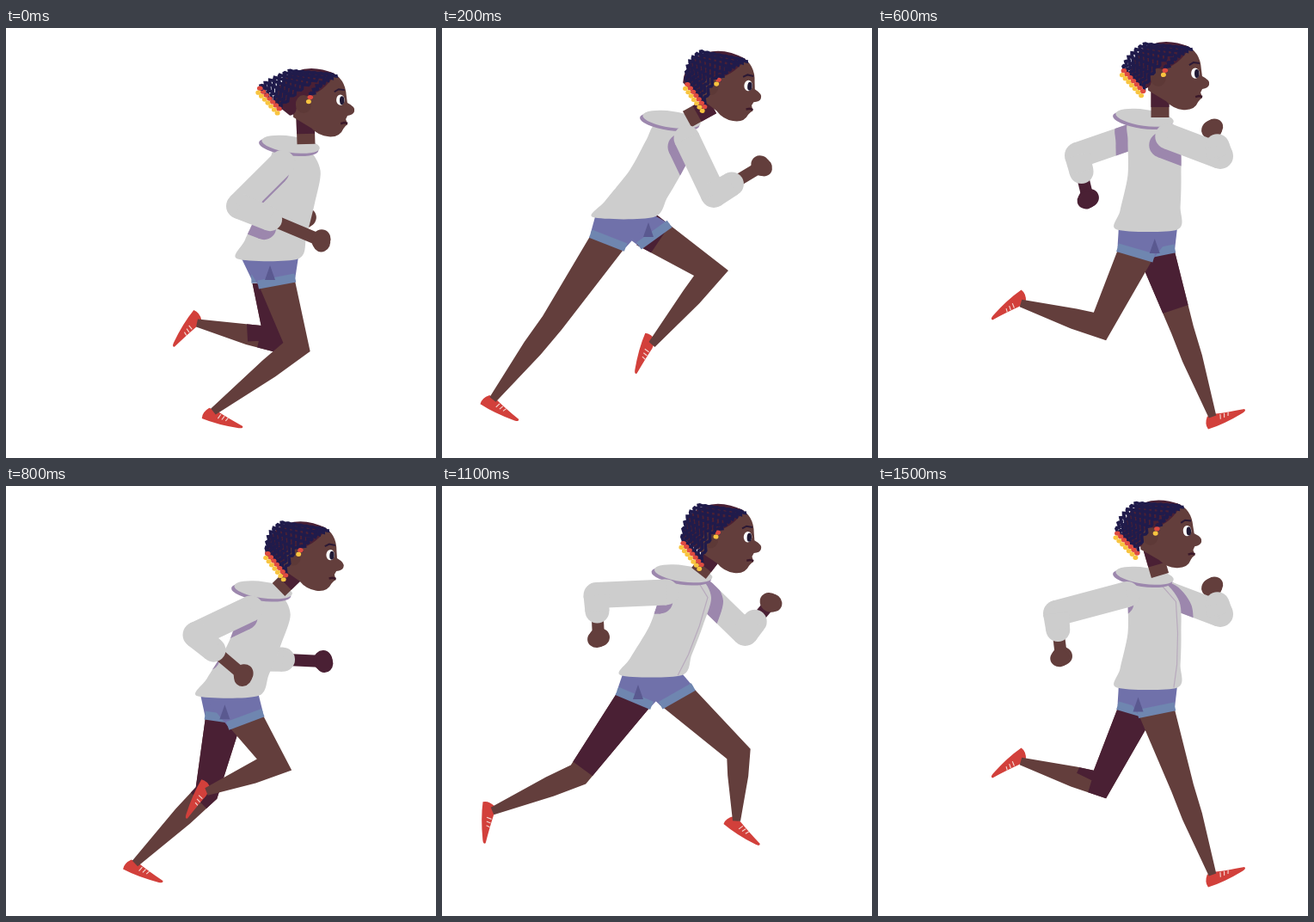
Animation, 500 px wide and 500 px high, one loop 1600 ms. Source, as an HTML page:

```html
<!DOCTYPE html>
<html lang="en">
<head>
<meta charset="utf-8">
<title>Runner</title>
<style>
html, body { margin: 0; height: 100%; overflow: hidden; background: #fff; }
svg { display: block; width: 100%; height: 100%; }
</style>
</head>
<body>
<svg id="stage" viewBox="0 0 500 500"></svg>
<script>
const SKIN = '#633e3c', DARK = '#4a2034', GREY = '#cdcdcd', PURPLE = '#9c87ad',
      DENIM = '#7071aa', CUFF = '#6f86b0', SHOE = '#d2403b', NAVY = '#201b4b';
const LOOP = 1600, STEP = 100;

// One stride. Legs: knee, ankle, foot angle. Arms: elbow and hand, relative to the collar.
// The nose has one place for each of the two strides in a loop.
const pass = {
  waist: [306, 266], collar: [338, 141], nose: [[405, 95], [405, 95]],
  trail: [338, 371, 241, 446, 17], lead: [311, 363, 222, 343, 124],
  front: [-67, 66, 28, 106], nearBack: [-67, 66, 28, 106], farBack: [0, 50, 10, 80]
};
const push = {
  waist: [213, 218], collar: [274, 112], nose: [[371, 80], [380, 90]],
  trail: [128, 343, 59, 432, 28], lead: [313, 285, 244, 368, 108],
  front: [42, 82, 97, 49], nearBack: [-104, 27, -89, 80], farBack: [-30, 50, -30, 80]
};
const flight = {
  waist: [277, 218], collar: [301, 103], nose: [[377, 54], [362, 53]],
  trail: [189, 328, 58, 324, 157], lead: [377, 338, 441, 411, -38],
  front: [88, 45, 92, 8], nearBack: [-112, 12, -122, 57], farBack: [-70, 40, -54, 86]
};
const land = {
  waist: [314, 232], collar: [317, 110], nose: [[385, 64], [376, 63]],
  trail: [258, 347, 166, 320, 140], lead: [354, 351, 389, 452, -23],
  front: [81, 39, 72, 8], nearBack: [-110, 38, -104, 88], farBack: [-85, 38, -73, 88]
};

// The near leg trails in the first stride and leads in the second.
function assign(stride, half) {
  const { waist, collar, nose, trail, lead, front, nearBack, farBack } = stride;
  return {
    waist, collar, nose: nose[half],
    nearLeg: half ? lead : trail, farLeg: half ? trail : lead,
    nearArm: half ? nearBack : front, farArm: half ? front : farBack
  };
}
const KEYS = [
  [0, pass, 0], [200, push, 0], [400, flight, 0], [500, flight, 0], [600, land, 0],
  [700, pass, 1], [900, push, 1], [1000, push, 1], [1200, flight, 1], [1500, land, 1],
  [LOOP, pass, 0]
].map(([time, stride, half]) => [time, assign(stride, half)]);

const mix = (a, b, u) => a.map((v, i) => v + (b[i] - v) * u);
const shift = ([x, y], dx, dy) => [x + dx, y + dy];

function poseAt(t) {
  const next = KEYS.findIndex(([time]) => time > t);
  const [t0, a] = KEYS[next - 1], [t1, b] = KEYS[next];
  const pose = {};
  for (const part in a) pose[part] = mix(a[part], b[part], (t - t0) / (t1 - t0));
  return pose;
}

const polygon = (points, fill) => `<polygon points="${points.join(' ')}" fill="${fill}"/>`;
const path = (d, fill) => `<path d="${d}" fill="${fill}"/>`;
const line = (points, color, width, extra = '') =>
  `<polyline points="${points.join(' ')}" fill="none" stroke="${color}" stroke-width="${width}" ${extra}/>`;
const ellipse = (x, y, rx, ry, fill) =>
  `<ellipse cx="${x}" cy="${y}" rx="${rx}" ry="${ry}" fill="${fill}"/>`;
const place = ([x, y], angle, body) =>
  `<g transform="translate(${x} ${y}) rotate(${angle})">${body}</g>`;
const clipped = (id, shape, body) =>
  `<clipPath id="${id}">${shape}</clipPath><g clip-path="url(#${id})">${body}</g>`;

// Closed Catmull-Rom curve.
function smooth(points) {
  const n = points.length, at = i => points[(i + n) % n];
  let d = 'M' + at(0);
  for (let i = 0; i < n; i++) {
    const [a, b, c, e] = [at(i - 1), at(i), at(i + 1), at(i + 2)];
    const c1 = b.map((v, k) => v + (c[k] - a[k]) / 7);
    const c2 = c.map((v, k) => v - (e[k] - b[k]) / 7);
    d += `C${c1} ${c2} ${c}`;
  }
  return d + 'Z';
}

function direction(a, b) {
  const length = Math.hypot(b[0] - a[0], b[1] - a[1]) || 1;
  return [(b[0] - a[0]) / length, (b[1] - a[1]) / length];
}

// Tapered outline with mitred joints; each joint is [x, y, radius].
function mitred(joints) {
  const last = joints.length - 1, left = [], right = [];
  joints.forEach(([x, y, r], i) => {
    const d0 = direction(joints[Math.max(i - 1, 0)], joints[Math.max(i, 1)]);
    const d1 = direction(joints[Math.min(i, last - 1)], joints[Math.min(i + 1, last)]);
    const k = r / Math.max(1 + d0[0] * d1[0] + d0[1] * d1[1], .5);
    const nx = -(d0[1] + d1[1]) * k, ny = (d0[0] + d1[0]) * k;
    left.push([x + nx, y + ny]);
    right.unshift([x - nx, y - ny]);
  });
  return [...left, ...right];
}

// Tapered outline with round joints.
const rounded = (joints, fill) => joints.map(([x, y, r], i) =>
  ellipse(x, y, r, r, fill) + (i ? polygon(mitred([joints[i - 1], [x, y, r]]), fill) : '')
).join('');

const shoe = '<g transform="scale(.94 .88)">' +
  path('M-6-3L5-2Q18 2 40 7Q42 10 36 11Q10 15-11 13Q-13 5-6-3Z', SHOE) +
  [10, 15, 20].map(x => line([x, x / 6 - 1, x - 2, 7], '#f3d9d4', 1.2)).join('') + '</g>';

// Thigh, cuff and outline all follow from the line between waist and knee.
function makeLeg(waist, [kx, ky, ax, ay, foot]) {
  const knee = [kx, ky], ankle = [ax, ay], d = direction(waist, knee);
  const hip = shift(waist, d[0] * 30, d[1] * 30);
  const drop = 24 + 20 * Math.abs(d[0]);
  const cuffMid = shift(waist, d[0] * drop, d[1] * drop);
  const across = direction([0, 0], [d[1] + .6, -d[0]]);
  const cuff = [-22, 22].map(w => shift(cuffMid, across[0] * w, across[1] * w));
  const outline = polygon(
    mitred([[...hip, 21], [...knee, 13.5], [...mix(knee, ankle, .33), 12], [...ankle, 4.5]]), SKIN);
  return {
    hip, knee, ankle, cuff, cuffMid, outline,
    body: place(ankle, foot, shoe) + outline,
    shorts: polygon([shift(waist, -34, -2), shift(waist, 34, 0), cuff[1], cuff[0]], DENIM) +
      line(cuff, CUFF, 10)
  };
}

// The near leg's shadow runs down the far leg, longest as the knees pass.
function legShadow(far, near) {
  const gap = near.knee[0] - far.knee[0];
  const reach = Math.max(0, 1.3 + Math.min(gap / 170, -gap / 500));
  const thigh = Math.hypot(far.knee[0] - far.hip[0], far.knee[1] - far.hip[1]);
  return clipped('farLeg', far.outline,
    line([far.hip, far.knee, far.ankle], DARK, 60, `stroke-dasharray="${reach * thigh} 999"`));
}

function makeArm(collar, [ex, ey, hx, hy], wristColor, fistColor) {
  const elbow = shift(collar, ex, ey), hand = shift(collar, hx, hy);
  const shoulder = shift(collar, ex / 4, 16), cuff = mix(elbow, hand, .38);
  const angle = Math.atan2(hy - ey, hx - ex) * 180 / Math.PI;
  const fist = ellipse(0, -1, 11, 12, fistColor) + ellipse(2, 2, 10, 11, fistColor);
  const sleeve = fill => rounded([[...shoulder, 15], [...elbow, 15], [...cuff, 14]], fill);
  return { sleeve, body: line([cuff, hand], wristColor, 14) + place(hand, angle, fist) + sleeve(GREY) };
}

// Points up the spine: fraction from waist to collar, then offset to the side.
const BACK = [[1, -25], [.83, -26], [.5, -25], [.16, -33], [-.02, -36]];
const FRONT = [[-.02, 34], [.2, 37], [.5, 37], [.8, 34], [1, 12]];
const alongSpine = (p, side) =>
  side.map(([up, out]) => shift(mix(p.waist, p.collar, up), out, 0));

const hood = ellipse(0, 2, 35, 10, PURPLE) + ellipse(2, -1, 34, 9.5, GREY);

function braid(start, bend, end) {
  const points = [];
  for (let i = 0; i <= 36; i++) {
    const u = i / 36, wave = 1.4 * Math.sin(i * 1.3);
    points.push(shift(mix(mix(start, bend, u), mix(bend, end, u), u), wave, wave));
  }
  return line(points, NAVY, 3.6) +
    ellipse(end[0] + 1, end[1], 3.3, 2.6, '#df4b40') +
    ellipse(end[0] - 1, end[1] + 5, 3, 2.6, '#f8c43f');
}

// Braids fan from the hairline to the nape; their ends trail behind by the lag.
function braids(lag) {
  let out = braid([356, 13], [338, 20], [325, 39]);
  for (let i = 0; i < 7; i++) {
    const u = i / 6;
    out += braid(mix([352, 11], [308, 7], u), mix([318, 20], [285, 16], u),
      shift(mix([303, 68], [281, 44], u), lag[0], lag[1]));
  }
  return out;
}

const face =
  path('M350 10Q367 17 368 38L369 46Q379 51 377 56Q376 60 369 61L367 65L369 71' +
       'Q366 73 364 76Q360 86 347 85Q335 84 327 75L306 62L305 25Z', SKIN) +
  path('M355 12Q320-3 296 17Q284 32 285 46L302 60Q312 58 309 46Q311 38 321 38Q342 34 355 12Z', DARK) +
  ellipse(318, 47, 9, 10.5, '#5d3937') +
  ellipse(361, 42.5, 4.8, 6.2, '#fff') + ellipse(362.8, 43, 2.7, 5, '#211a35') +
  line([354, 33, 359, 30, 366, 31], '#2b1935', 2) +
  line([361, 70, 365, 69, 369, 70], '#3a1829', 2.5);

function headAndNeck({ nose, collar }, lag) {
  const top = shift(nose, -57, 10), base = shift(collar, 11, -6);
  const tilt = (nose[0] - collar[0] - 70) / 5;
  return line([top, base], SKIN, 21) + line([top, mix(top, base, .6)], DARK, 21) +
    place(nose, tilt, `<g transform="translate(-377 -54)">${face}${braids(lag)}</g>`);
}

function figure(t) {
  const p = poseAt(t), before = poseAt((t + LOOP - STEP) % LOOP);
  const lag = p.nose.map((v, i) => (before.nose[i] - v) / 2);
  const nearLeg = makeLeg(p.waist, p.nearLeg), farLeg = makeLeg(p.waist, p.farLeg);
  const nearArm = makeArm(p.collar, p.nearArm, SKIN, SKIN);
  const farArm = makeArm(p.collar, p.farArm, DARK, p.farArm[0] < 0 ? DARK : SKIN);
  const front = alongSpine(p, FRONT);
  const torso = path(smooth([...alongSpine(p, BACK), ...front]), GREY);
  const torsoShade = torso.replace(GREY, PURPLE);
  const fold = mix(p.waist, farLeg.cuffMid, .8);
  const zip = p.nearArm[0] < -90 ? line(front.map(q => shift(q, -4, 0)), '#b8aabd', 1.2) : '';

  return farArm.body +
    clipped('farSleeve', farArm.sleeve(GREY),
      place([14 * Math.sign(p.farArm[0]), 4], 0, torsoShade)) +
    farLeg.body + legShadow(farLeg, nearLeg) + farLeg.shorts +
    nearLeg.body + nearLeg.shorts +
    polygon([shift(fold, 0, -10), shift(fold, -6, 7), shift(fold, 6, 7)], '#5a5990') +
    torso + zip +
    clipped('torso', torso, place([-7, 10], 0, nearArm.sleeve(PURPLE))) +
    place(shift(p.collar, -9, -5), 8, hood) +
    headAndNeck(p, lag) + nearArm.body;
}

const stage = document.getElementById('stage');
let shown = -1;
function tick() {
  const t = Math.floor(performance.now() % LOOP / STEP) * STEP;
  if (t !== shown) stage.innerHTML = figure(shown = t);
  requestAnimationFrame(tick);
}
tick();
</script>
</body>
</html>
```
